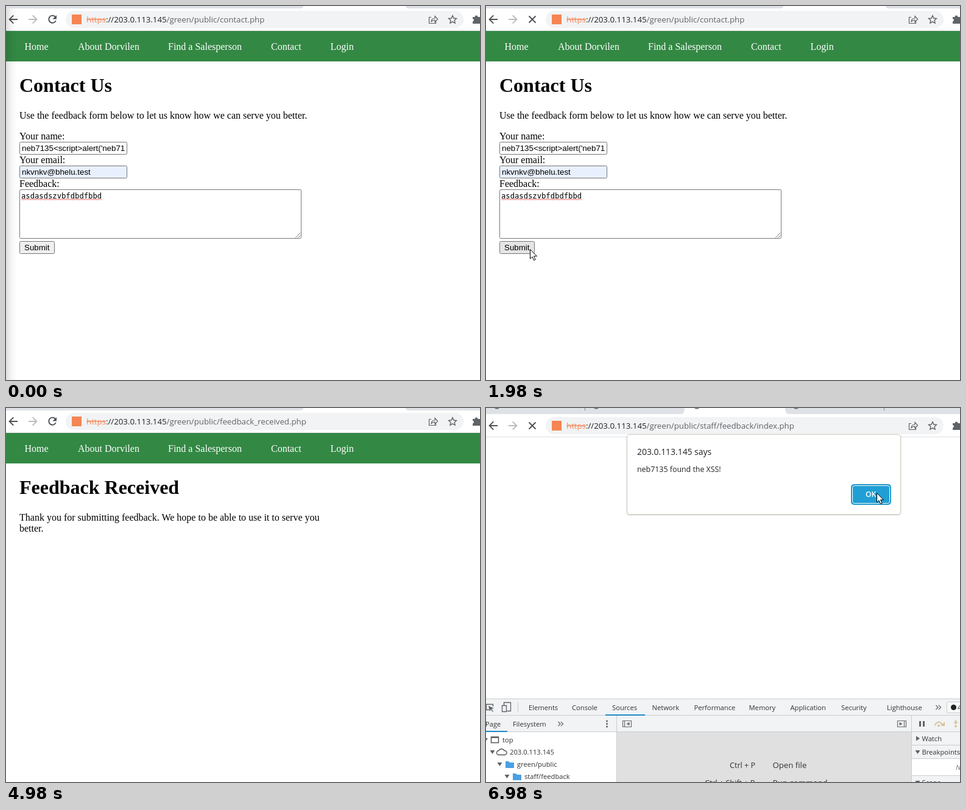
An HTML page for the animation above (8 s loop, 778 by 614 pixels).

```html
<!DOCTYPE html>
<html lang="en">
<head>
<meta charset="utf-8">
<title>Feedback form demo</title>
<style>
  html, body { margin: 0; width: 100%; height: 100%; overflow: hidden; background: #fff; }
  svg { display: block; width: 778px; height: 614px; }
  text { white-space: pre; }
  .serif { font-family: "Liberation Serif", serif; font-size: 16px; }
  .ui { font-family: "Open Sans", sans-serif; font-size: 11.2px; fill: #333; }
  .form { font-family: "Liberation Sans", sans-serif; font-size: 13.33px; }
  .mono { font-family: "DejaVu Sans Mono", monospace; font-size: 12.2px; }
</style>
</head>
<body>
<svg id="stage" viewBox="0 0 778 614"></svg>
<script>
const stage = document.getElementById('stage');
const HOST = '203.0.113.145';
const LOOP = 8000;

const text = (kind, x, y, str, attrs = '') => `<text class="${kind}" x="${x}" y="${y}" ${attrs}>${str}</text>`;
const serif = (x, y, str, attrs) => text('serif', x, y, str, attrs);
const ui = (x, y, str, size = 11.2, fill = '#333') => text('ui', x, y, str, `style="font-size:${size}px;fill:${fill}"`);
const rect = (x, y, w, h, fill, attrs = '') => `<rect x="${x}" y="${y}" width="${w}" height="${h}" fill="${fill}" ${attrs}/>`;
const dot = (x, y, r, fill) => `<circle cx="${x}" cy="${y}" r="${r}" fill="${fill}"/>`;
const line = (d, color, width = 1) => `<path d="${d}" fill="none" stroke="${color}" stroke-width="${width}"/>`;
const shape = (d, fill) => `<path d="${d}" fill="${fill}"/>`;
const shift = (y, content) => `<g transform="translate(0 ${y})">${content}</g>`;
const box = (x, y, w, h, fill) => rect(x + .5, y + .5, w - 1, h - 1, fill, 'rx="2" stroke="#767676"');
const cursor = (x, y) =>
  `<path transform="translate(${x} ${y})" d="M.5 .7V16l3.5-3.3 2.6 5.8 2.5-1.1-2.5-5.6h4.9Z" fill="#fff" stroke="#000"/>`;

// Tab strip and toolbar; the active tab is the white gap between left and right.
function browserBar(path, loading, left, right, height, top) {
  const strip = shape(`M0 0H${left}Q${left} ${height} ${left - 6} ${height}H0Z
    M${right} 0H778V${height}H${right + 6}Q${right} ${height} ${right} 0Z`, '#dee1e6');
  const reload = loading
    ? line('M70.5 16.5l11 11M81.5 16.5l-11 11', '#4d5156', 1.9)
    : line('M80.6 17.5A6 6 0 1 0 81.8 24', '#4d5156', 1.9) + shape('M83 15v6.6h-6.6Z', '#4d5156');
  const address = '<tspan fill="#f58a5c" text-decoration="line-through">https</tspan>' +
    `<tspan fill="#202124">://${HOST}</tspan><tspan fill="#5f6368">${path}</tspan>`;
  return strip + shift(top,
    line('M19 22H6M12.3 15.3L5.6 22l6.7 6.7', '#4d5156', 1.9) +
    line('M37 22h13M43.7 15.3l6.7 6.7-6.7 6.7', '#babcbe', 1.9) + reload +
    rect(98, 8, 653, 28, '#f1f3f4', 'rx="14"') +
    rect(108, 14, 16, 16, '#f58553') +
    text('ui', 132, 27, address, 'style="font-size:13.25px"') +
    line('M698 18.5h-3.5v10h11V25M698 25.5q.5-5.5 6-5.5v-3.5l4.5 5-4.5 5v-3.4q-4 0-6 2.4Z', '#5f6368', 1.2) +
    line('M733 15.8l1.9 4.2 4.6.5-3.4 3.1 1 4.6-4.1-2.4-4.1 2.4 1-4.6-3.4-3.1 4.6-.5Z', '#5f6368', 1.4) +
    shape('M766 18h3.6a2.4 2.4 0 0 1 4.8 0H778v11h-12v-3.5a2.4 2.4 0 0 0 0-4.7Z', '#5f6368') +
    line('M0 40.5H778', '#dcdfe2'));
}

const navBar = (y, items) => rect(0, y, 778, 50, '#338844') +
  items.map(([x, label, fill = '#fff']) => serif(x, y + 31, label, `fill="${fill}"`)).join('');
const heading = (y, str) => serif(22, y, str, 'style="font-size:32px;font-weight:bold"');

const publicPage = (path, loading, content) =>
  browserBar(path, loading, 488, 656, 4, 0) +
  navBar(41, [[30.5, 'Home'], [118, 'About Dorvilen'], [266, 'Find a Salesperson'], [435, 'Contact'], [532.5, 'Login']]) +
  content;

function contactPage({ loading = false, hover = false, shadow = false }) {
  const squiggle = 'M25 318.5' + 'l2 -2l2 2'.repeat(33);
  return publicPage('/green/public/contact.php', loading,
    heading(141, 'Contact Us') +
    serif(22, 185, 'Use the feedback form below to let us know how we can serve you better.') +
    serif(22, 219, 'Your name:') + serif(22, 258, 'Your email:') + serif(22, 297, 'Feedback:') +
    box(22, 223, 177, 21, '#fff') +
    '<clipPath id="field"><rect x="25" y="224" width="171" height="19"/></clipPath>' +
    text('form', 26, 238, "neb7135&lt;script&gt;alert('neb7135 found the XSS!')", 'clip-path="url(#field)"') +
    box(22, 262, 177, 21, '#e8f0fe') + text('form', 26, 277, 'nkvnkv@bhelu.test') +
    box(22, 301, 463, 81, '#fff') + text('mono', 25, 316, 'asdasdszvbfdbdfbbd') +
    line(squiggle, '#e33', .9) +
    line('M475 380.5l8-8M479.5 380.5l4-4', '#777') +
    box(22, 386, 58, 21, hover ? '#e5e5e5' : '#efefef') + text('form', 30, 401, 'Submit') +
    (shadow ? `<linearGradient id="edge"><stop stop-opacity=".13"/><stop offset=".5" stop-opacity=".04"/>
      <stop offset="1" stop-opacity="0"/></linearGradient>` + rect(0, 4, 18, 610, 'url(#edge)') : ''));
}

const receivedPage = () => publicPage('/green/public/feedback_received.php', false,
  heading(141, 'Feedback Received') +
  serif(22, 185, 'Thank you for submitting feedback. We hope to be able to use it to serve you') +
  serif(22, 203, 'better.'));

const staffBar = loading => browserBar('/green/public/staff/feedback/index.php', loading, 326, 491, 10, 7) +
  [18, 181, 346, 509].map(x => line(`M${x - 3.5} -1.5a3.5 2.5 0 0 0 7 0`, '#5f6368', 1.4)).join('') +
  line('M162.5 0v4M653.5 0v4', '#85888c');

const entries = [
  ['Not a hacker', 'plainnote@entry.invalid'], ['Jolly', 'haha@jokes.test'],
  ['mainmanning', 'eee@e.test', '&gt;'], ['user', 'user@home.test'],
  ['eee', 'eeeeee@low.test', '&gt;'], ['user1', 'user1@home.test'],
  ['inbox', 'inbox@home.test'], ['Unit', 'room4@box.test'],
  ['sample', 'trial@trials', '&gt;'], ['wk', 'k@w.test', 'afs'], ['prowl', 'prowl@home.test']
];

function feedbackPage() {
  const columns = [25, 122, 296];
  const bold = 'font-weight="bold"';
  return staffBar(false) +
    navBar(48, [[30.5, 'Public Site'], [149, 'Staff Menu'], [269, 'Log out', '#b30f0f']]) +
    heading(148, 'Feedback') +
    serif(51.5, 213, 'Name', bold) + serif(186.5, 213, 'Email', bold) + serif(299, 213, 'Feedback', bold) +
    entries.map((row, r) => row.map((cell, c) => serif(columns[c], 235 + 22 * r, cell)).join('')).join('') +
    serif(371, 257, 'someone@box.test') + serif(509, 257, '&gt;') +
    rect(0, 460, 778, 17, '#f1f1f1') + rect(7, 462, 771, 13, '#d1cbbb');
}

const folder = (x, y) => shape(`M${x} ${y}h5l2 2h7v9h-14Z`, '#4b9fe3');
const openMark = (x, y) => shape(`M${x} ${y}h8l-4 6Z`, '#5f6368');

function devTools() {
  const tabs = [[70, 'Elements'], [141, 'Console'], [207, 'Sources'], [272.5, 'Network'], [341.5, 'Performance'],
    [431.5, 'Memory'], [499.5, 'Application'], [583, 'Security'], [658, 'Lighthouse']];
  const panelIcon = (x, flip) => line(`M${x} 513.5h14v10h-14ZM${x + (flip ? 11 : 3)} 513.5v10`, '#6e6e6e', 1.2) +
    shape(flip ? `M${x + 3} 515.5v6l5-3Z` : `M${x + 11} 515.5v6l-5-3Z`, '#6e6e6e');
  const chevrons = (x, y) => line(`M${x} ${y}l3.5 3.5-3.5 3.5M${x + 4.5} ${y}l3.5 3.5-3.5 3.5`, '#5f6368', 1.2);
  return rect(0, 477, 778, 137, '#f1f3f4') +
    rect(0, 532, 214, 82, '#fff') + rect(215, 532, 483, 82, '#e0e0e0') + rect(699, 576, 79, 27, '#fff') +
    line('M0 477.5H778M0 504.5H778M0 531.5H778M214.5 505V614M698.5 505V614', '#cacdd1') +
    line('M699 553.5h79M699 575.5h79M699 603.5h79M52.5 483v17', '#cacdd1') +
    line('M5 495.5H.5V486.5H11.5V490', '#5f6368', 1.3) + shape('M4 489l9 4-4 1 3 4-1 1-3-4-2 3Z', '#5f6368') +
    line('M29.5 489v-5.5h11v14h-6M26.5 488.5h7v10h-7Z', '#5f6368', 1.3) +
    tabs.map(([x, label]) => ui(x, 496, label)).join('') +
    rect(196, 503, 65, 2, '#2089c9') + rect(0, 530, 35, 2, '#2089c9') +
    chevrons(738.5, 488) + chevrons(118.5, 515) +
    rect(756.5, 482.5, 30, 18, '#f7f8f8', 'rx="2" stroke="#cacdd1"') +
    dot(767.5, 491.5, 4.5, '#222') + ui(774, 496, '4') +
    ui(-1, 523, 'Page') + ui(44, 523, 'Filesystem') +
    [514, 518.5, 523].map(y => dot(198.5, y, 1.5, '#5f6368')).join('') +
    panelIcon(224.5, false) + panelIcon(675.5, true) +
    rect(711, 514, 3, 9, '#5f6368') + rect(717, 514, 3, 9, '#5f6368') +
    line('M736.5 521q6.5-11 13 0M771 512v5', '#d6c49a', 2) +
    shape('M753 515v7h-7ZM767 515.5h8l-4 4Z', '#d6c49a') +
    dot(743, 521.5, 2, '#d6c49a') + dot(771, 522.5, 2, '#d6c49a') +
    openMark(-5, 542) + openMark(6.5, 562) + openMark(18.5, 582) + openMark(30.5, 602) +
    line('M8.5 540h12v9.5h-12ZM8.5 541h12', '#555', 1.5) +
    line('M21 569.5a3.5 3.5 0 0 1 0-7 5 5 0 0 1 9 0 3.5 3.5 0 0 1 1 7Z', '#555', 1.4) +
    folder(32, 580) + folder(44, 600) +
    ui(27, 549, 'top') + ui(39, 569, HOST) + ui(51, 589, 'green/public') + ui(63, 609, 'staff/feedback') +
    ui(400, 591, 'Ctrl + P', 12.6) + ui(470.5, 591, 'Open file', 13.2) +
    ui(359, 620, 'Ctrl + Shift + P', 12.6) + ui(470.5, 620, 'Run command', 13.2) +
    shape('M706 538.5v8l6-4Z', '#5f6368') + openMark(704.5, 562) + openMark(704.5, 612) +
    ui(715.5, 547, 'Watch') + ui(715.5, 569, 'Breakpoints') + ui(715.5, 619, 'Scope') +
    text('ui', 771, 594, 'Not paused', 'font-style="italic" style="fill:#777"');
}

const alertBox = () =>
  rect(231.5, 43.5, 449, 131, '#fff', 'rx="4" stroke="#d3cdbd" style="filter:drop-shadow(0 1px 1px #0003)"') +
  ui(248, 77, `${HOST} says`, 13.9, '#202124') +
  ui(248, 105, 'neb7135 found the XSS!', 12.4, '#202124') +
  rect(599, 125, 66, 34, '#1f97cb', 'rx="5"') +
  rect(601.5, 127.5, 61, 29, '#219fd4', 'rx="3" stroke="#fff"') +
  text('ui', 623, 146, 'OK', 'style="font-size:12px;font-weight:600;fill:#fff"');

const scenes = [
  [0, () => contactPage({ shadow: true })],
  [1000, () => contactPage({ shadow: true, hover: true }) + cursor(68, 400)],
  [1980, () => contactPage({ loading: true, hover: true }) + cursor(72, 399)],
  [3000, () => receivedPage() + cursor(473, 122)],
  [3980, () => receivedPage() + cursor(526, 61)],
  [4980, () => receivedPage()],
  [5980, () => feedbackPage() + devTools() + cursor(411, 9)],
  [6980, () => staffBar(true) + devTools() + alertBox() + cursor(641, 139)]
];

let shown;
function render(now) {
  const time = now % LOOP;
  const scene = scenes.findLast(([start]) => time >= start);
  if (scene !== shown) stage.innerHTML = scene[1]();
  shown = scene;
  requestAnimationFrame(render);
}
render(performance.now());
</script>
</body>
</html>
```
